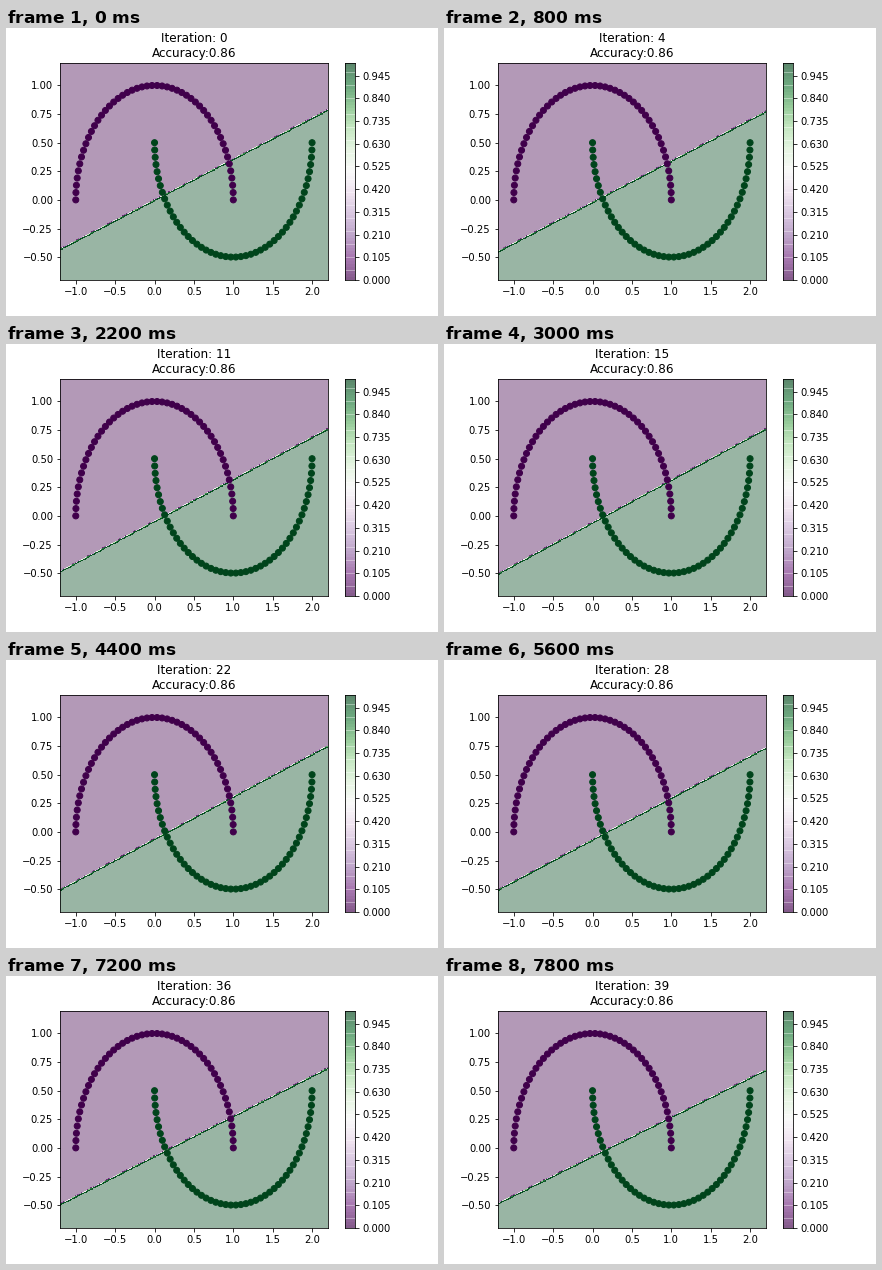
Write a matplotlib script that moves like this. It is 432 px wide and 288 px high and loops after 8000 ms.

```python
import numpy as np
import matplotlib.pyplot as plt
from matplotlib.animation import FuncAnimation

FRAMES, INTERVAL = 40, 200
CMAP = plt.get_cmap("PRGn")
LEVELS = np.arange(68) * 0.015
TOP = LEVELS[-1]
ALPHA = 0.4
X0, X1, Y0, Y1 = -1.2, 2.2, -0.7, 1.2

plt.rcParams["font.family"] = "DejaVu Sans"
fig = plt.figure(figsize=(6, 4), dpi=72)
LEFT, BOTTOM, HEIGHT = 0.125, 0.125, 0.755
WIDTH = 0.775
ax = fig.add_axes([LEFT, BOTTOM, WIDTH * 0.8, HEIGHT])
cax = fig.add_axes([LEFT + WIDTH * 0.85, BOTTOM, HEIGHT * 4 / 6 / 20, HEIGHT])

# Two interleaving half circles
t = np.linspace(0, np.pi, 50)
px = np.concatenate([np.cos(t), 1 - np.cos(t)])
py = np.concatenate([np.sin(t), 0.5 - np.sin(t)])
label = np.repeat([0, 1], 50)
xx, yy = np.meshgrid(np.linspace(X0, X1, 341), np.linspace(Y0, Y1, 191))

# Height of the boundary at both sides of the plot, by iteration
KEYS = [0, 7, 15, 22, 28, 32, 39]
LEFT_Y = [-0.433, -0.468, -0.508, -0.508, -0.508, -0.507, -0.487]
RIGHT_Y = [0.785, 0.759, 0.759, 0.750, 0.733, 0.716, 0.679]


def classify(x, y, i):
    a = np.interp(i, KEYS, LEFT_Y)
    b = np.interp(i, KEYS, RIGHT_Y)
    return (y < a + (b - a) * (x - X0) / (X1 - X0)).astype(float)


def draw_colorbar():
    px_size = TOP / (HEIGHT * 288)
    rows = np.round(LEVELS / px_size)
    for k in range(len(LEVELS) - 1):
        color = CMAP((LEVELS[k] + 0.0075) / TOP)
        lo, n = rows[k], rows[k + 1] - rows[k]
        # taller bands keep one pale row
        for size in (n, min(n, 3)):
            cax.bar(0.5, size * px_size, 1, lo * px_size, color=color,
                    alpha=ALPHA, linewidth=0, antialiased=False)
    cax.set(xlim=(0, 1), ylim=(0, TOP), xticks=[])
    cax.yaxis.tick_right()
    cax.set_yticks(LEVELS[::7], [f"{v:.3f}" for v in LEVELS[::7]])


draw_colorbar()
ax.scatter(px, py, c=label, cmap=CMAP, zorder=2)
ax.set(xlim=(X0, X1), ylim=(Y0, Y1))
title = ax.set_title("")
regions = []


def update(i):
    while regions:
        regions.pop().remove()
    regions.append(ax.contourf(xx, yy, classify(xx, yy, i), LEVELS,
                               cmap=CMAP, alpha=ALPHA, zorder=1))
    ax.set(xlim=(X0, X1), ylim=(Y0, Y1))
    accuracy = np.mean(classify(px, py, i) == label)
    title.set_text(f"Iteration: {i}\nAccuracy:{accuracy:.2f}")
    return regions + [title]


anim = FuncAnimation(fig, update, frames=FRAMES, interval=INTERVAL,
                     init_func=lambda: update(0), repeat=True, repeat_delay=0)
plt.show()
```
